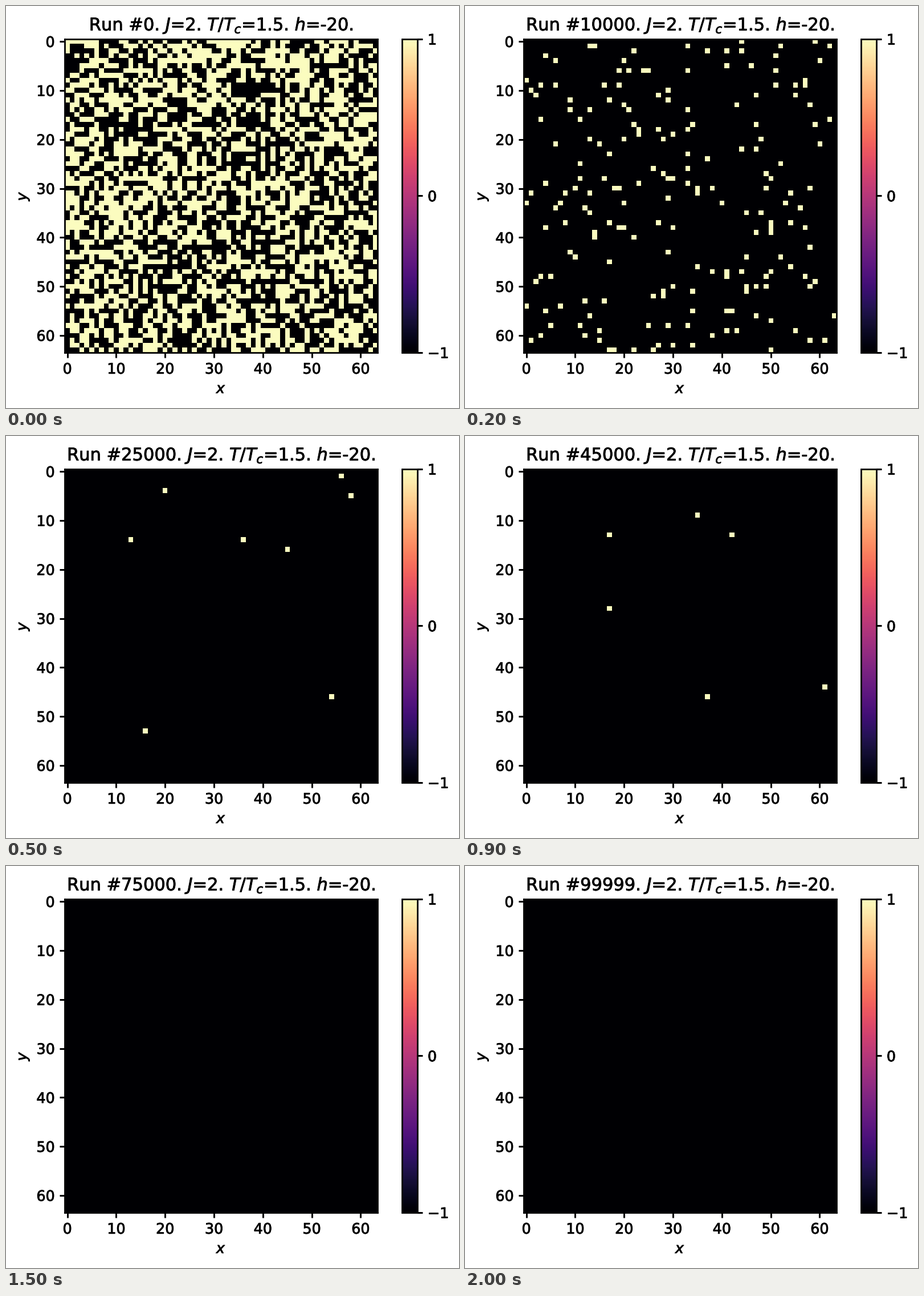
These frames come from a looping animation (795 px wide and 704 px high, 2100 ms). A matplotlib script:

```python
import math

import numpy as np
import matplotlib.pyplot as plt
from matplotlib import patheffects
from matplotlib.animation import FuncAnimation

W, H, DPI = 795, 704, 183
N, FRAMES, STEP, LAST = 64, 21, 5000, 99999
J, T_RATIO, FIELD = 2, 1.5, -20
TEMP = T_RATIO * 2 * J / math.log(1 + math.sqrt(2))


def simulate(seed=7):
    """Metropolis spin flips from a random start, one snapshot per frame."""
    rng = np.random.default_rng(seed)
    spins = rng.choice([-1, 1], (N, N))
    sites = rng.integers(0, N, (LAST + 1, 2)).tolist()
    chances = rng.random(LAST + 1)
    shots = []
    for run, (x, y) in enumerate(sites):
        if run % STEP == 0:
            shots.append(spins.copy())
        near = (spins[y - 1, x] + spins[(y + 1) % N, x]
                + spins[y, x - 1] + spins[y, (x + 1) % N])
        cost = spins[y, x] * (J * near + 2 * FIELD)
        if cost <= 0 or chances[run] < math.exp(-cost / TEMP):
            spins[y, x] *= -1
    shots.append(spins)
    return shots


def place(left, top, width, height):
    return fig.add_axes([left / W, 1 - (top + height) / H, width / W, height / H])


plt.rcParams.update({
    "font.family": "DejaVu Sans",
    "axes.linewidth": 1.1,
    "xtick.major.width": 1.2,
    "ytick.major.width": 1.2,
})
shots = simulate()
fig = plt.figure(figsize=((W + 0.01) / DPI, (H + 0.01) / DPI), dpi=DPI, facecolor="white")
ax = place(103.3, 58, 549, 549)
image = ax.imshow(shots[0], cmap="magma", vmin=-1, vmax=1,
                  interpolation="nearest", aspect="auto")
ax.set_xticks(range(0, N, 10))
ax.set_yticks(range(0, N, 10))
ax.set_xlabel("$x$")
ax.set_ylabel("$y$")
bar = fig.colorbar(image, cax=place(694.6, 58, 27.5, 549), ticks=[-1, 0, 1])

# Slightly heavier lettering
heavy = [patheffects.withStroke(linewidth=0.35, foreground="black")]
for text in [ax.title, ax.xaxis.label, ax.yaxis.label, *ax.get_xticklabels(),
             *ax.get_yticklabels(), *bar.ax.get_yticklabels()]:
    text.set_path_effects(heavy)


def update(i):
    run = min(i * STEP, LAST)
    image.set_data(shots[i])
    ax.set_title(f"Run #{run}. $J$={J}. $T/T_c$={T_RATIO}. $h$={FIELD}.")
    return [image]


anim = FuncAnimation(fig, update, frames=FRAMES, interval=100, repeat=True,
                     repeat_delay=0, blit=False)
plt.show()
```
